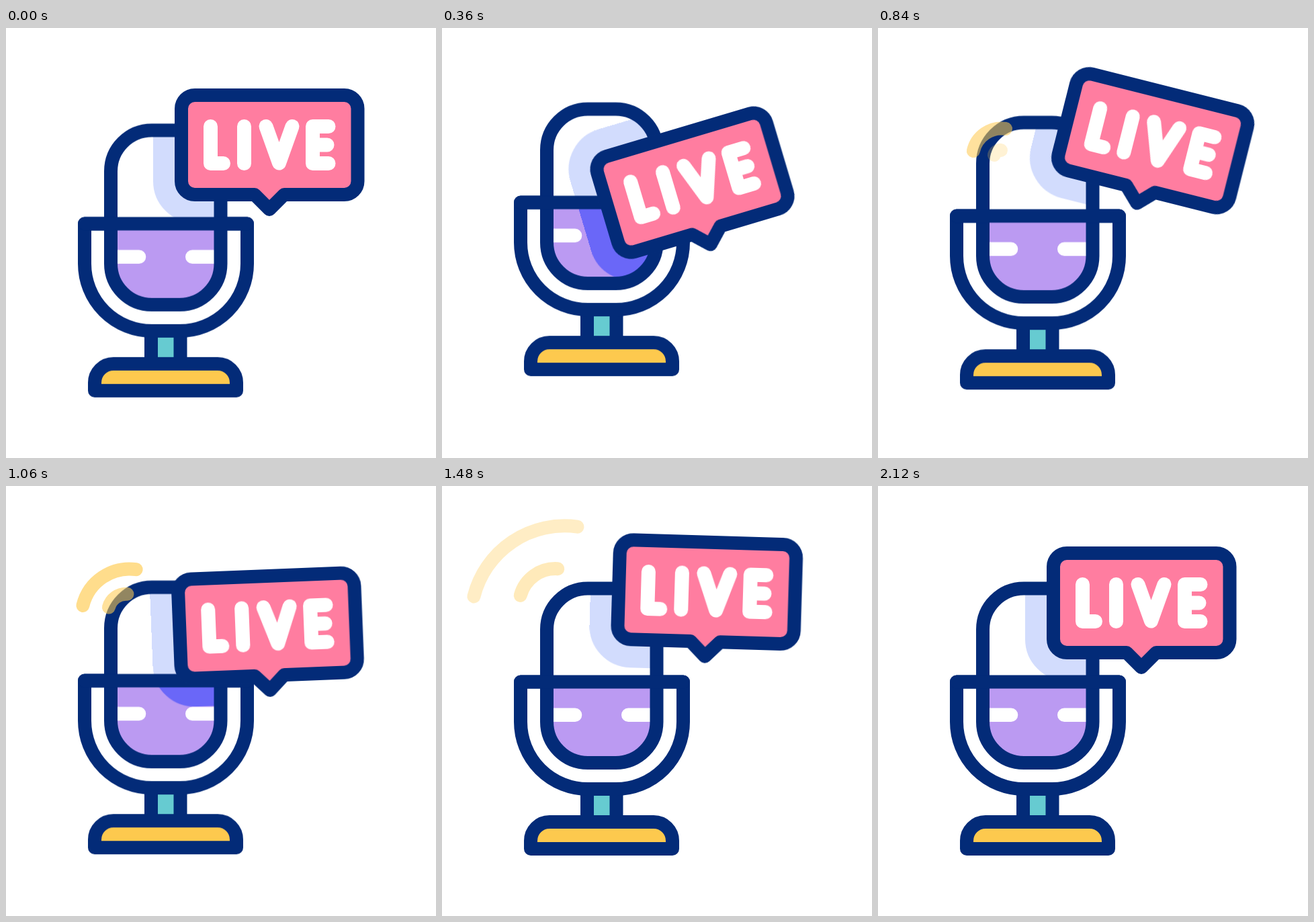
Recreate the animation shown at these times as an HTML page without scripts. Size 640 px wide and 640 px high, loop 2.4 s.

```html
<!DOCTYPE html>
<html lang="en">
<head>
<meta charset="utf-8">
<title>Live microphone</title>
<style>
  html, body { margin: 0; width: 100%; height: 100%; overflow: hidden; background: #fff; }
  svg { display: block; width: 100%; height: 100%; }

  .line { fill: none; stroke: #032b78; stroke-width: 20; stroke-linecap: round; stroke-linejoin: round; }
  .white { fill: #fff; }
  .pink { fill: #ff7da0; }
  .teal { fill: #66cbd1; }
  .gold { fill: #fdc94e; }
  .letters { fill: none; stroke: #fff; stroke-width: 21; stroke-linecap: round; stroke-linejoin: round; }
  .shade { stroke-width: 84; stroke-linejoin: round; }
  .pale { fill: #d2dcfd; stroke: #d2dcfd; }
  .deep { fill: #6a67f8; stroke: #6a67f8; }
  .wave { fill: none; stroke: #ffcb50; stroke-width: 20; stroke-linecap: round; opacity: 0; }

  .hop, .unhop, .bob, .swing, .wave { animation: 2400ms linear infinite; }
  .hop { animation-name: hop; }
  .unhop { animation-name: unhop; }
  .bob, .swing { animation-timing-function: cubic-bezier(.364, 0, .636, 1); }
  .bob { animation-name: bob; }
  .swing { animation-name: swing; transform-origin: 392px 243px; }
  .big { animation-name: big; }
  .small { animation-name: small; }

  /* two ballistic hops; unhop cancels them for the cast shadow */
  @keyframes hop {
    0%, 24.83% { transform: translateY(0); animation-timing-function: cubic-bezier(.333, .667, .667, 1); }
    12.42% { transform: translateY(-33.3px); animation-timing-function: cubic-bezier(.333, 0, .667, .333); }
    34.92% { transform: translateY(-11.8px); animation-timing-function: cubic-bezier(.333, 0, .667, .333); }
    45%, 100% { transform: translateY(0); }
  }
  @keyframes unhop {
    0%, 24.83% { transform: translateY(0); animation-timing-function: cubic-bezier(.333, .667, .667, 1); }
    12.42% { transform: translateY(33.3px); animation-timing-function: cubic-bezier(.333, 0, .667, .333); }
    34.92% { transform: translateY(11.8px); animation-timing-function: cubic-bezier(.333, 0, .667, .333); }
    45%, 100% { transform: translateY(0); }
  }
  @keyframes bob {
    0% { transform: translateY(0); }
    14.17% { transform: translateY(54px); }
    29.5% { transform: translateY(-27px); }
    44.38% { transform: translateY(34px); }
    60.42% { transform: translateY(-17px); }
    75.42% { transform: translateY(17px); }
    88.33%, 100% { transform: translateY(0); }
  }
  @keyframes swing {
    0% { transform: rotate(0deg); }
    18.33% { transform: rotate(-18deg); }
    32.92% { transform: rotate(15deg); }
    50.42% { transform: rotate(-9deg); }
    67.08% { transform: rotate(5deg); }
    82.5% { transform: rotate(-1.5deg); }
    88.33%, 100% { transform: rotate(0deg); }
  }
  @keyframes big {
    0%, 23.33% { opacity: 0; d: path("M173 188.5A11 11 0 0 1 186 180"); }
    35% { opacity: .56; d: path("M142 183A43 43 0 0 1 190 150"); }
    45% { opacity: .66; d: path("M112 177.5A74 74 0 0 1 194 122"); }
    53.33% { opacity: .57; d: path("M72.5 171A113.5 113.5 0 0 1 198 85.5"); }
    67.5% { opacity: .16; d: path("M30 160A157 157 0 0 1 204 43.5"); }
    70.83% { opacity: .06; d: path("M22 158A165 165 0 0 1 205 36"); }
    71.67%, 100% { opacity: 0; d: path("M22 158A165 165 0 0 1 205 36"); }
  }
  @keyframes small {
    0%, 27.5% { opacity: 0; d: path("M185 197A2.2 2.2 0 0 1 187 195"); }
    35% { opacity: .24; d: path("M173 189A9.6 9.6 0 0 1 183 182"); }
    45.83% { opacity: .63; d: path("M149.4 179A29.7 29.7 0 0 1 180 157"); }
    53.33% { opacity: .6; d: path("M133 172A43.6 43.6 0 0 1 178 140"); }
    70.83% { opacity: .16; d: path("M99 153A65 65 0 0 1 166 105"); }
    74.17%, 100% { opacity: 0; d: path("M92.5 149A69 69 0 0 1 164 98.5"); }
  }
</style>
</head>
<body>
<svg viewBox="0 0 640 640" role="img" aria-label="Microphone with a LIVE sign">
  <defs>
    <rect id="body" x="156" y="152.5" width="163.5" height="259.5" rx="61"/>
    <path id="sign" d="M281 100H503.5a20 20 0 0 1 20 20V228a20 20 0 0 1-20 20H414L392 270 370 248H281a20 20 0 0 1-20-20V120a20 20 0 0 1 20-20Z"/>
    <path id="yoke" d="M117 291.5H359V351A100 100 0 0 1 259 451H217A100 100 0 0 1 117 351Z"/>
    <path id="base" d="M132 540V528a28 28 0 0 1 28-28H315a28 28 0 0 1 28 28V540Z"/>
    <clipPath id="top"><path d="M156 291.5V213.5a61 61 0 0 1 61-61H258.5a61 61 0 0 1 61 61V291.5Z"/></clipPath>
    <clipPath id="low"><path d="M156 291.5H319.5V351a61 61 0 0 1-61 61H217a61 61 0 0 1-61-61Z"/></clipPath>
  </defs>

  <g class="hop">
    <rect class="teal" x="216" y="451" width="43.5" height="49"/>
    <path class="line" d="M216 451V500M259.5 451V500"/>
    <use href="#base" class="gold"/>
    <use href="#base" class="line"/>
    <use href="#yoke" class="white"/>
    <use href="#yoke" class="line"/>

    <g clip-path="url(#top)">
      <use href="#body" class="white"/>
      <g class="unhop"><g class="bob"><g class="swing"><use href="#sign" class="shade pale"/></g></g></g>
    </g>
    <g clip-path="url(#low)">
      <use href="#body" fill="#bb9af2"/>
      <g class="unhop"><g class="bob"><g class="swing"><use href="#sign" class="shade deep"/></g></g></g>
    </g>

    <path class="white" d="M160 330.5H198a10.3 10.3 0 0 1 0 20.6H160ZM315 330.5H277.3a10.3 10.3 0 0 0 0 20.6H315Z"/>
    <use href="#body" class="line"/>
    <path class="line" d="M117 291.5H359"/>
  </g>

  <path class="wave big" d="M173 188.5A11 11 0 0 1 186 180"/>
  <path class="wave small" d="M185 197A2.2 2.2 0 0 1 187 195"/>

  <g class="bob">
    <g class="swing">
      <use href="#sign" class="pink"/>
      <use href="#sign" class="line"/>
      <path class="letters" d="M304.5 146.5V201.5H323.5M354.5 146.5V201.5M387 146.5L406.5 201 426 146.5M480 146.5H456.5V201.5H480M456.5 174H478"/>
    </g>
  </g>
</svg>
</body>
</html>
```
